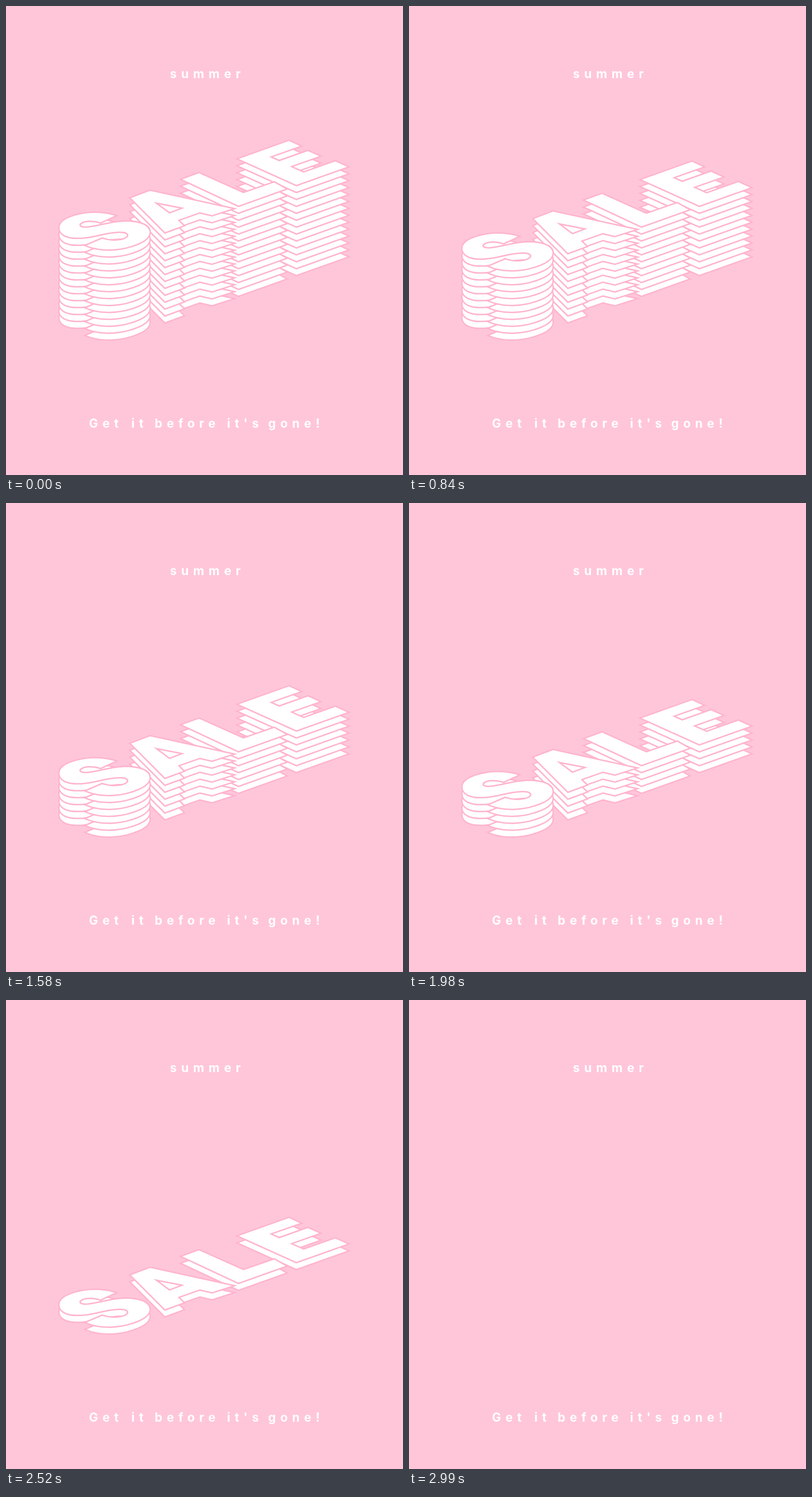
Animation, 689 px wide and 813 px high, one loop 3.29 s. Source, as an HTML page with a canvas:

```html
<!DOCTYPE html>
<html lang="en">
<head>
<meta charset="utf-8">
<title>Summer sale</title>
<style>
  html, body { margin: 0; width: 100%; height: 100%; overflow: hidden; background: #ffc6da; }
  canvas { display: block; }
</style>
</head>
<body>
<canvas id="stage" width="689" height="813"></canvas>
<script>
const ctx = document.getElementById('stage').getContext('2d');
const PINK = '#ffc6da', EDGE = '#ffb4ce', WHITE = '#fff';
const LOOP = 3290, LAYERS = 14, STEP = 12;
// One layer is taken off the top at each of these times.
const DROPS = [500, 670, 840, 1040, 1210, 1410, 1580, 1780, 1980, 2180, 2350, 2520, 2720, 2990];

// Letter E on a slanted grid: a runs along the arms, b down the stem.
const slanted = (a, b) => `${404 + a + b},${265 - 0.355 * a + 0.45 * b}`;
const E = 'M' + [
  [0, 0], [87, 0], [87, 19], [34, 19], [34, 36], [84, 36],
  [84, 55.5], [33, 55.5], [33, 79.5], [88, 79.5], [88, 100], [0, 100]
].map(p => slanted(...p)).join('L') + 'Z';

const S = `M189,363.5 C170,357.5 140,356 115,365 C100,370 93,377 93,384
  C93,396 106,402.5 130,401.5 C153,400.5 170,392 196,391
  C208,390.5 214,394 212,399 C209,406.5 186,410 167,403.5
  L140,415 C158,423 190,425 217,416 C240,409 249,401 249,392
  C249,380 230,373 204,374 C180,375 155,384 138,384.5
  C128,384.5 125,380 129,376.5 C136,370.5 153,371 164,375 Z`;
const A = `M217,333 L250,320.5 L392,351.5 L357.5,362.5 L336.5,357.5
  L298,371 L307.5,380.5 L276,392 Z M256,339.5 L283.5,360 L310,350 Z`;
const L = 'M335,290 L306,300.5 L403.5,346 L485,317 L465.5,306 L412,324.5 Z';
const letters = [S, A, L, E].map(d => new Path2D(d));

function drawLayer(index) {
  ctx.save();
  ctx.translate(0, index * STEP);
  for (const letter of letters) {
    ctx.stroke(letter);
    ctx.fill(letter, 'evenodd');
  }
  ctx.restore();
}

function drawText() {
  ctx.font = '700 21px Inter, sans-serif';
  ctx.letterSpacing = '7.7px';
  ctx.fillText('summer', 284.5, 124.5);
  const words = [['Get', 144], ['it', 217.5], ['before', 258], ["it's", 383.5], ['gone!', 455]];
  for (const [word, x] of words) ctx.fillText(word, x, 730.5);
}

function draw(now) {
  const time = now % LOOP;
  const gone = DROPS.filter(t => t <= time).length;
  ctx.fillStyle = PINK;
  ctx.fillRect(0, 0, 689, 813);
  ctx.fillStyle = WHITE;
  ctx.strokeStyle = EDGE;
  ctx.lineWidth = 5;
  ctx.miterLimit = 4;
  drawText();
  for (let i = LAYERS - 1; i >= gone; i--) drawLayer(i);
}

const start = performance.now();
function tick() {
  draw(performance.now() - start);
  requestAnimationFrame(tick);
}
tick();
</script>
</body>
</html>
```
